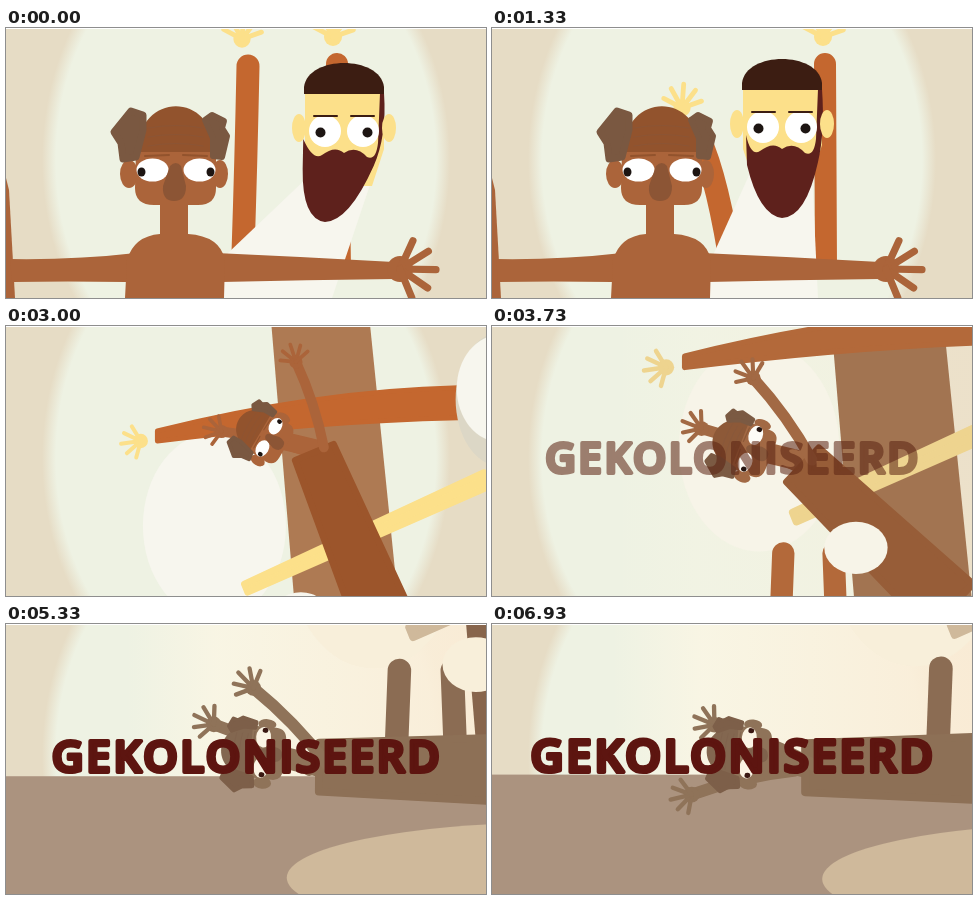
Write an HTML page with a canvas that moves like this. It is 480 px wide and 270 px high and loops after 7.07 s.

```html
<!DOCTYPE html>
<html lang="nl">
<head>
<meta charset="utf-8">
<style>
html, body { margin: 0; width: 100%; height: 100%; overflow: hidden; background: #eef2e3; }
canvas { display: block; width: 480px; height: 270px; }
</style>
</head>
<body>
<canvas id="stage" width="480" height="270"></canvas>
<script>
const ctx = document.getElementById('stage').getContext('2d');
const layer = document.createElement('canvas');
layer.width = 480;
layer.height = 270;

const LOOP = 7070, STEP = 1000 / 15, CUT = 1730;

// Each colour: bright version, version under the sepia veil
const PALETTE = {
  skin: ['#ab643a', '#8f7359'], dome: ['#92532d', '#836750'], torso: ['#9c552b', '#8d7056'],
  hair: ['#7a5841', '#7d5f49'], nose: ['#8c5535', '#7f624c'], white: ['#f7f6ee', '#f8efda'],
  shade: ['#dcd7c6', '#d8c9ae'], yellow: ['#fce08a', '#cfb99b'], orange: ['#c4672f', '#8b6c53'],
  beam: ['#ae7a53', '#87654c'], floor: ['#838b92', '#ab937f'], cap: ['#3c1d12', '#3c1d12'],
  beard: ['#5e211c', '#5e211c'], eye: ['#ffffff', '#fbf4e4'], ink: ['#1d1512', '#3a1812'],
  title: ['#5c2a14', '#5d1510']
};

let now = 0, veil = 0;

const clamp = x => Math.min(1, Math.max(0, x));
const lerp = (a, b, u) => a + (b - a) * u;
const smooth = x => clamp(x) ** 2 * (3 - 2 * clamp(x));
const rad = deg => deg * Math.PI / 180;

function tone(name) {
  const [a, b] = PALETTE[name].map(hex => parseInt(hex.slice(1), 16));
  return 'rgb(' + [16, 8, 0].map(s => Math.round(lerp(a >> s & 255, b >> s & 255, veil))) + ')';
}

function oval(x, y, rx, ry, color) {
  ctx.fillStyle = tone(color);
  ctx.beginPath();
  ctx.ellipse(x, y, rx, ry, 0, 0, 7);
  ctx.fill();
}

function shape(path, color, outline = 0) {
  const p = new Path2D(path);
  ctx.fillStyle = ctx.strokeStyle = tone(color);
  ctx.fill(p);
  if (outline) { ctx.lineWidth = outline; ctx.stroke(p); }
}

function stroke(path, width, color) {
  ctx.strokeStyle = tone(color);
  ctx.lineWidth = width;
  ctx.stroke(new Path2D(path));
}

function hand(x, y, dir, size, color) {
  oval(x, y, size * 0.36, size * 0.36, color);
  for (let i = -2; i <= 2; i++) {
    const a = dir + i * 0.58, r = size * (1 - Math.abs(i) * 0.07);
    stroke(`M${x} ${y} l${Math.cos(a) * r} ${Math.sin(a) * r}`, size * 0.2, color);
  }
}

function placed(x, y, turn, scale, draw) {
  ctx.save();
  ctx.translate(x, y);
  ctx.rotate(rad(turn));
  ctx.scale(scale, scale);
  draw();
  ctx.restore();
}

// Heads are drawn around the point between the eyes
function baldHead() {
  oval(-47, 4, 9, 14, 'skin');
  oval(44, 4, 8, 14, 'skin');
  shape('M-40 -20 C-38 -74 36 -76 40 -20 V18 Q40 35 22 35 H-22 Q-41 35 -41 18Z', 'skin');
  shape('M-37 -18 C-40 -78 38 -80 38 -18Z', 'dome');
  for (const y of [-42, -33, -24]) stroke(`M-28 ${y} Q0 ${y - 5} 27 ${y}`, 1, 'nose');
  shape('M-62 -38 L-45 -59 L-33 -55 L-33 -40 L-40 -13 L-53 -11 L-55 -27Z', 'hair', 7);
  shape('M29 -50 L36 -55 L48 -49 L46 -42 L51 -34 L46 -13 L37 -14 L37 -32Z', 'hair', 6);
  for (const side of [-1, 1]) {
    oval(side * 23.5, 0, 16, 11.5, 'eye');
    oval(side * 34.5, 2, 4, 4.5, 'ink');
    stroke(`M${side * 7} -15 L${side * 31} -14`, 2, 'dome');
  }
  shape('M-6 -4 Q0 -10 5 -4 L10 16 Q10 31 -2 31 Q-14 31 -13 16Z', 'nose');
}

function beardedHead(lean = 0) {
  const l = lean;
  shape('M-39 -42 H40 V18 L28 55 H-28 L-39 22Z', 'yellow');
  shape(`M${-36 + l / 4} 8 Q-31 30 -22 24 Q-9 14 0 22 Q12 14 23 26 Q32 30 34 12 L36 -38 H40
    Q43 5 ${36 + l / 3} 35 Q${24 + l} 90 ${l} 91 Q${-23 + l} 88 ${-35 + l / 3} 38Z`, 'beard');
  shape('M-40 -37 V-44 C-36 -76 36 -76 40 -44 V-37Z', 'cap');
  for (const side of [-1, 1]) {
    oval(side * 45, -3, 7, 14, 'yellow');
    oval(side * 19, 0, 16, 16, 'eye');
    oval(side * 23.5, 1.5, 5, 5, 'ink');
    stroke(`M${side * 7} -15 H${side * 30}`, 2, 'cap');
  }
}

function backdrop() {
  ctx.save();
  ctx.translate(240, 132);
  ctx.scale(1, 1.25);
  const glow = ctx.createRadialGradient(0, 0, 190, 0, 0, 204);
  glow.addColorStop(0, '#eef2e3');
  glow.addColorStop(1, '#e6dcc5');
  ctx.fillStyle = glow;
  ctx.fillRect(-240, -132, 480, 270);
  ctx.restore();
  const warm = ctx.createLinearGradient(120, 0, 480, 0);
  warm.addColorStop(0, 'rgba(251,246,228,0)');
  warm.addColorStop(0.25, `rgba(251,246,228,${0.8 * veil})`);
  warm.addColorStop(1, `rgba(250,236,214,${0.95 * veil})`);
  ctx.fillStyle = warm;
  ctx.fillRect(0, 0, 480, 270);
}

function closeUp() {
  const u = smooth(now / 1330), x = lerp(338, 290, u);
  hand(lerp(236, 190, u), lerp(11, 80, u), -1.5, 24, 'yellow');
  hand(lerp(327, 331, u), 9, -1.5, 25, 'yellow');
  stroke(`M237 225 Q${lerp(240, 222, u)} 135 ${lerp(242, 202, u)} ${lerp(38, 100, u)}`, 23, 'orange');
  stroke(`M334 240 L${lerp(331, 333, u)} 36`, 22, 'orange');
  shape(`M${x - 32} 145 H${x + 30} L326 270 H216 L222 225Z`, 'white');
  placed(x, lerp(103, 99, u), 0, 1, () => beardedHead(lerp(-19, 0, u)));

  shape('M0 150 L3 162 L9 270 H0Z', 'skin');
  shape('M4 231 Q70 232 130 225 H210 Q300 229 388 234 V251 Q300 252 215 254 H120 Q60 253 6 254Z', 'skin');
  hand(394, 241, 0.02, 36, 'skin');
  shape('M119 270 L121 232 Q128 208 154 206 V165 H182 V206 Q214 208 219 232 L218 270Z', 'skin');
  placed(170, 142, 0, 1, baldHead);
}

function standingLeg(x, footX, width) {
  stroke(`M${x} 210 L${footX} 262`, width, 'orange');
  oval(footX - 3, 268, width * 0.9, width * 0.35, 'orange');
}

function helperBody() {
  oval(190, 153, 43, 56, 'white');
  standingLeg(203, 201, 12);
  standingLeg(230, 232, 12);
  shape('M208 188 L352 121 L356 129 L210 193Z', 'yellow', 4);
}

function helperArm() {
  shape('M164 92 Q260 68 345 66 V84 Q260 86 164 98Z', 'orange', 3);
  hand(154, 98, 3, 12, 'yellow');
}

function helperHead() {
  placed(373, 40, 0, 0.33, () => {
    oval(-33, 112, 82, 122, 'shade');
    oval(-33, 92, 80, 98, 'white');
    stroke('M45 115 V-75', 20, 'orange');
    hand(44, -90, -1.5, 26, 'yellow');
    beardedHead();
  });
}

function fallingArm(x, y, deg, length) {
  const c = Math.cos(rad(deg)) * length, s = Math.sin(rad(deg)) * length;
  stroke(`M${x} ${y} Q${x + c * 0.5 - s * 0.06} ${y + s * 0.5 + c * 0.06} ${x + c} ${y + s}`, 6, 'skin');
  hand(x + c, y + s, rad(deg), 11, 'skin');
}

function fallingMan(tip, swing, late) {
  fallingArm(24, 9, 166 + 40 * swing - 39 * late, 54);
  stroke('M0 0 L29 7', 11, 'skin');
  placed(27, 7, 79 * (1 - tip), 1, () => {
    for (const side of [0, -32]) stroke(`M130 ${side + 8} Q170 ${side - 8} 187 ${side + 22}`, 11, 'skin');
    oval(140, -3, 18, 34, 'white');
    shape('M2 -12 L112 -16 V18 L2 13Z', 'torso', 4);
  });
  fallingArm(33, 6, -50 - 85 * swing - 23 * late, 54);
  placed(0, 0, -55 - 30 * tip, 0.33, baldHead);
}

// The camera closes in on the falling man and keeps his head in place,
// so the surroundings slide off to the upper right.
function wide() {
  const k = Math.max(0, (now - 2200) / 1530);
  const settle = 1 - Math.exp(-2.2 * k), tip = smooth(k / 2.15);
  const drift = 205 * (1 - Math.exp(-0.6 * k)), fall = 180 * tip;
  const world = (draw, dx = drift, dy = fall) => placed(dx - 278, -dy - 73, 0, 1, draw);

  placed(lerp(278, 256, settle), lerp(73, 129, settle), 0, 1 + 0.97 * settle, () => {
    world(() => {
      ctx.fillStyle = tone('floor');
      ctx.fillRect(-300, 264, 1000, 400);
    });
    world(() => oval(295, 272, 135, 28, 'yellow'), drift * 0.9, Math.min(fall, 135));
    world(() => {
      shape('M205 -200 H260 L305 243 L242 246Z', 'beam');
      helperBody();
    });
    world(helperArm, drift * 0.85, fall * 0.85);
    world(helperHead);
    fallingMan(tip, settle, smooth((now - 5330) / 1600));
    world(() => oval(242, 207, 17, 14, 'white'));
  });
}

function title() {
  const alpha = clamp((now - 3400) / 600);
  if (!alpha) return;
  // Drawn opaque on its own layer so fill and outline fade as one
  const c = layer.getContext('2d'), scale = 0.98 + (now - 3730) * 0.000024;
  c.setTransform(1, 0, 0, 1, 0, 0);
  c.clearRect(0, 0, 480, 270);
  c.setTransform(scale, 0, 0, scale, 240, 131.5);
  c.font = '600 43px "Open Sans", "Noto Sans", sans-serif';
  c.letterSpacing = '2.6px';
  c.textAlign = 'center';
  c.lineJoin = c.lineCap = 'round';
  c.lineWidth = 4;
  c.fillStyle = c.strokeStyle = tone('title');
  c.fillText('GEKOLONISEERD', 1, 16);
  c.strokeText('GEKOLONISEERD', 1, 16);
  ctx.globalAlpha = alpha;
  ctx.drawImage(layer, 0, 0);
  ctx.globalAlpha = 1;
}

const start = performance.now();

function frame() {
  const t = (performance.now() - start) % LOOP;
  now = Math.min(104, Math.floor(t / STEP + 0.06)) * STEP;
  veil = clamp((now - 3500) / 760);
  ctx.lineJoin = ctx.lineCap = 'round';
  backdrop();
  if (now < CUT) closeUp(); else wide();
  ctx.fillStyle = '#fff';
  ctx.fillRect(0, 0, 480, 1);
  title();
  requestAnimationFrame(frame);
}
frame();
</script>
</body>
</html>
```
